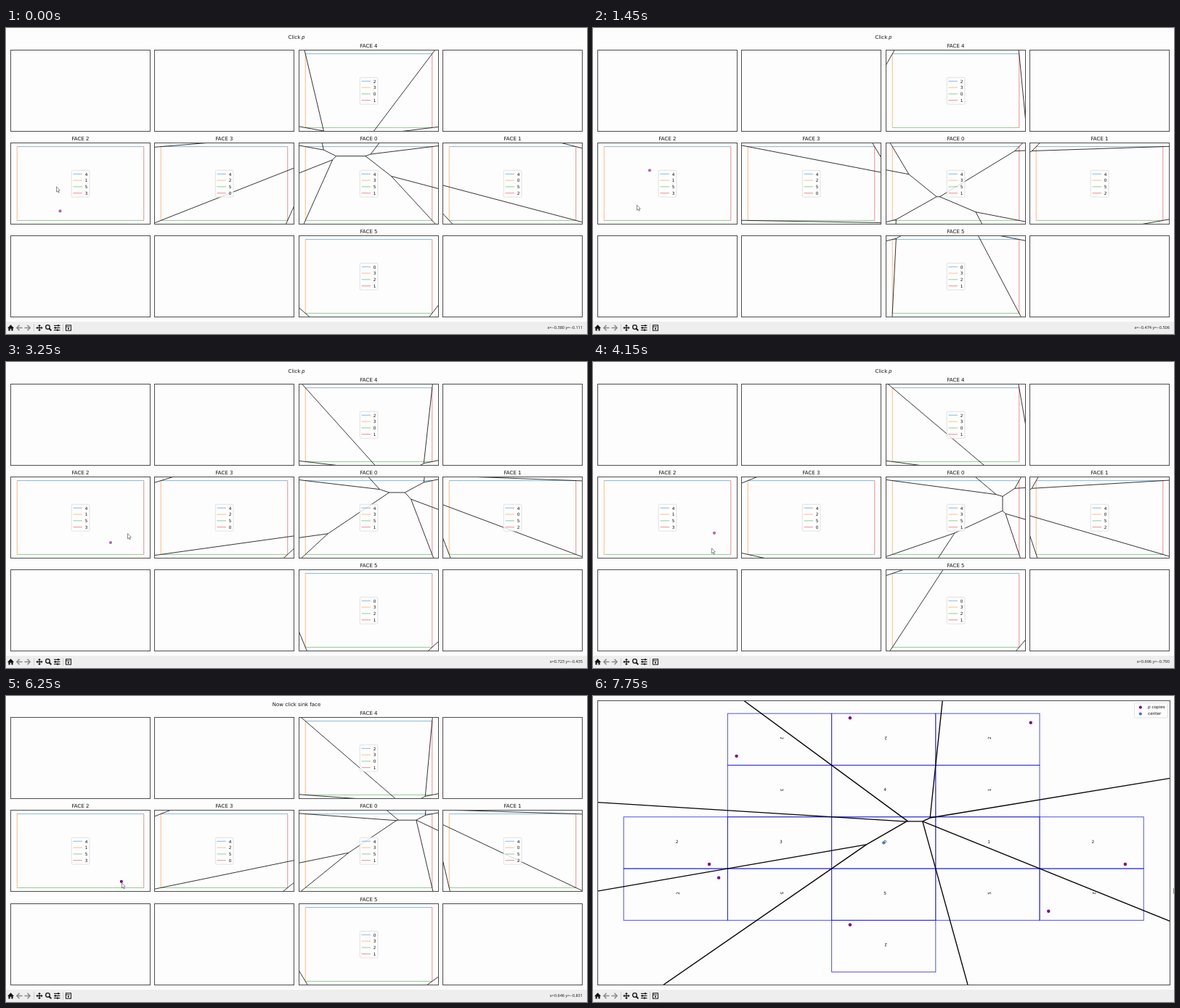
Animation, 800 px wide and 422 px high, one loop 8 s. Source, as an HTML page with a canvas:

```html
<!DOCTYPE html>
<html lang="en">
<head>
<meta charset="utf-8">
<title>Cut locus on a cube</title>
<style>
  html, body { margin: 0; width: 800px; height: 422px; overflow: hidden; }
  canvas { display: block; }
</style>
</head>
<body>
<canvas id="stage" width="800" height="422"></canvas>
<script>
const ctx = document.getElementById('stage').getContext('2d');
const LOOP = 8000, CLICKED = 6100, RESULT = 7200, REDRAW = 450;
const SANS = '"DejaVu Sans", sans-serif';
const PAPER = '#fdfdfe', BORDER = '#4c4c4c', PURPLE = '#800080', BLUE = '#4a78b5';
const SIDE_COLORS = ['#1f77b4', '#ff7f0e', '#2ca02c', '#d62728'];
const PANEL_W = 192, PANEL_H = 112, UNIT_X = PANEL_W / 2.2, UNIT_Y = PANEL_H / 2.2;

// Neighbours of each cube face: top, left, bottom, right.
const ADJ = [[4, 3, 5, 1], [4, 0, 5, 2], [4, 1, 5, 3], [4, 2, 5, 0], [2, 3, 0, 1], [0, 3, 2, 1]];
const DX = [0, -1, 0, 1], DY = [1, 0, -1, 0];
// Column and row of each face in the grid of panels.
const CELL = [[2, 1], [3, 1], [0, 1], [1, 1], [2, 0], [2, 2]];

// Mouse stops, reached every second redraw, starting before the loop does.
const STOP = 2 * REDRAW, FIRST_STOP = -1300;
const STOPS = [[74.5, 252.4], [69, 218], [78, 196.3], [60, 243.2], [144, 249], [167, 235.8],
  [163, 256], [158.9, 256.8], [158.9, 256.8], [544.5, 181.5], [799, 264.5]];

function mouse(t) {
  const s = Math.max(0, (t - FIRST_STOP) / STOP), i = Math.min(Math.floor(s), STOPS.length - 2);
  const ease = 1 - (1 - Math.min(1, s - i)) ** 2;
  return STOPS[i].map((v, axis) => v + (STOPS[i + 1][axis] - v) * ease);
}

const turn = ([x, y], r) => [[x, y], [-y, x], [-x, -y], [y, -x]][r];

// Images of p seen from a face, one per unfolding path to face 2.
function unfold(face, p) {
  const images = [];
  (function visit(path) {
    const [f, x, y, r] = path.at(-1);
    if (f === 2) {
      const [dx, dy] = turn(p, r);
      images.push({ x: x + dx, y: y + dy, path });
      return;
    }
    if (path.length === 4) return;
    ADJ[f].forEach((g, k) => {
      if (path.some(node => node[0] === g)) return;
      const d = (k + r) % 4;
      visit([...path, [g, x + 2 * DX[d], y + 2 * DY[d], (d + 6 - ADJ[g].indexOf(f)) % 4]]);
    });
  })([[face, 0, 0, 0]]);
  return images;
}

// Images that are nearest, ties included, somewhere on the closed face.
function nearest(images) {
  const kept = new Set(), n = 25;
  for (let i = -n; i <= n; i++) for (let j = -n; j <= n; j++) {
    const dist = images.map(s => (s.x - i / n) ** 2 + (s.y - j / n) ** 2);
    const best = Math.min(...dist) + 1e-6;
    images.forEach((s, k) => { if (dist[k] <= best) kept.add(s); });
  }
  return [...kept];
}

// Edges of the Voronoi diagram as [x1, y1, x2, y2].
function voronoi(sites) {
  const edges = [];
  sites.forEach((a, i) => sites.slice(i + 1).forEach(b => {
    const mx = (a.x + b.x) / 2, my = (a.y + b.y) / 2;
    const dx = a.y - b.y, dy = b.x - a.x;
    let lo = -40, hi = 40;
    for (const c of sites) {
      if (c === a || c === b) continue;
      const nx = c.x - a.x, ny = c.y - a.y;
      const slope = dx * nx + dy * ny;
      const room = (c.x ** 2 + c.y ** 2 - a.x ** 2 - a.y ** 2) / 2 - mx * nx - my * ny;
      if (Math.abs(slope) < 1e-9) { if (room < -1e-9) hi = lo; }
      else if (slope > 0) hi = Math.min(hi, room / slope);
      else lo = Math.max(lo, room / slope);
    }
    if (lo < hi) edges.push([mx + lo * dx, my + lo * dy, mx + hi * dx, my + hi * dy]);
  }));
  return edges;
}

const cache = new Map();
function faceEdges(face, p) {
  const key = [face, ...p].join();
  if (!cache.has(key)) cache.set(key, voronoi(nearest(unfold(face, p))));
  return cache.get(key);
}

function line(x1, y1, x2, y2, color, width) {
  ctx.strokeStyle = color;
  ctx.lineWidth = width;
  ctx.beginPath();
  ctx.moveTo(x1, y1);
  ctx.lineTo(x2, y2);
  ctx.stroke();
}

function poly(points, fill) {
  ctx.fillStyle = fill;
  ctx.beginPath();
  points.forEach(([x, y]) => ctx.lineTo(x, y));
  ctx.closePath();
  ctx.fill();
}

function dot(x, y, r, color) {
  ctx.fillStyle = color;
  ctx.beginPath();
  ctx.arc(x, y, r, 0, 7);
  ctx.fill();
}

function frame(x, y, w, h, color = BORDER, width = 1) {
  ctx.strokeStyle = color;
  ctx.lineWidth = width;
  ctx.strokeRect(x, y, w, h);
}

function text(str, x, y, size, align = 'center', style = '', family = SANS) {
  ctx.font = `${style} ${size}px ${family}`;
  ctx.textAlign = align;
  ctx.fillStyle = '#111';
  ctx.fillText(str, x, y);
}

function legendBox(x, y, w, h) {
  ctx.fillStyle = 'rgba(255,255,255,.8)';
  ctx.beginPath();
  ctx.roundRect(x, y, w, h, 1.5);
  ctx.fill();
  ctx.strokeStyle = '#dadada';
  ctx.lineWidth = .8;
  ctx.stroke();
}

function drawEdges(edges, X, Y, box, width) {
  ctx.save();
  ctx.beginPath();
  ctx.rect(...box);
  ctx.clip();
  for (const [x1, y1, x2, y2] of edges) line(X(x1), Y(y1), X(x2), Y(y2), '#000', width);
  ctx.restore();
}

function panelBox(col, row, clicked) {
  const top = clicked ? 29.5 + Math.floor(128.5 * row) : 30.5 + 128 * row;
  return [6.5 + Math.round(198.4 * col), top, PANEL_W, PANEL_H];
}

// Stage position in the units of the panel below it.
function toUnits([x, y]) {
  const col = Math.floor((x - 3) / 198.4), row = Math.floor((y - 22) / 128);
  const [left, top] = panelBox(col, row);
  return [(x - left - PANEL_W / 2) / UNIT_X, (top + PANEL_H / 2 - y) / UNIT_Y];
}

function drawFace(face, box, p, clicked) {
  const cx = box[0] + PANEL_W / 2, cy = box[1] + PANEL_H / 2;
  const X = u => cx + u * UNIT_X, Y = v => cy - v * UNIT_Y;
  text('FACE ' + face, cx, box[1] - 3.4, 7);
  const corners = [[1, 1], [-1, 1], [-1, -1], [1, -1]];
  ctx.globalAlpha = .65;
  corners.forEach(([x, y], k) => {
    const [x2, y2] = corners[(k + 1) % 4];
    line(X(x), Y(y), X(x2), Y(y2), SIDE_COLORS[k], .8);
  });
  ctx.globalAlpha = 1;
  if (face !== 2) drawEdges(faceEdges(face, p), X, Y, box, .8);
  legendBox(cx - 12.2, cy - 18.2, 24.6, 36.8);
  ADJ[face].forEach((g, k) => {
    const y = cy - 13.2 + k * 8.8;
    ctx.globalAlpha = .65;
    line(cx - 10, y, cx + 2.5, y, SIDE_COLORS[k], .8);
    ctx.globalAlpha = 1;
    text(g, cx + 8, y + 2.2, 5.8);
  });
  if (face === 2) dot(X(p[0]), Y(p[1]), 2.1, clicked ? PURPLE : 'rgba(128,0,128,.6)');
}

function drawPanels(t, tick) {
  const clicked = t >= CLICKED;
  if (clicked) text('Now click sink face', 400, 13.6, 7);
  else {
    text('Click ', 388.5, 14.6, 7, 'left');
    text('p', 407.1, 14.6, 7, 'left', 'italic');
  }
  const p = toUnits(mouse(tick - STOP));
  CELL.forEach((cell, face) => drawFace(face, panelBox(...cell, clicked), p, clicked));
  for (let i = 0; i < 12; i++) frame(...panelBox(i % 4, i >> 2, clicked));
}

const finalImages = nearest(unfold(0, [.646, -.829]));
const finalEdges = voronoi(finalImages);
const finalFaces = new Map(finalImages.flatMap(s => s.path).map(n => [n[1] + ',' + n[2], n]));

function drawResult() {
  const box = [6.5, 6.5, 788, 392];
  const X = u => 400.2 + u * 71.6, Y = v => 202.4 - v * 35.65;
  for (const [face, x, y, r] of finalFaces.values()) {
    frame(X(x - 1), Y(y + 1), 143.2, 71.3, 'rgba(25,25,215,.75)');
    ctx.save();
    ctx.translate(X(x) + (r ? 3 : 1.8), Y(y) - 1.8);
    ctx.rotate(-r * Math.PI / 2);
    text(face, 0, 2, 5.8);
    ctx.restore();
  }
  drawEdges(finalEdges, X, Y, box, 1.35);
  finalImages.forEach(s => dot(X(s.x), Y(s.y), 2.2, PURPLE));
  dot(X(0), Y(0), 2.1, BLUE);
  frame(...box);
  legendBox(745.5, 9.5, 45.5, 20.5);
  dot(753.8, 15.6, 2.1, PURPLE);
  dot(753.8, 24.6, 2.1, BLUE);
  text('p', 764, 17.4, 5.7, 'left', 'italic');
  text('copies', 769.4, 17.4, 5.7, 'left');
  text('center', 764, 26.4, 5.7, 'left');
}

function drawToolbar(t, tick) {
  ctx.fillStyle = '#eeeeee';
  ctx.fillRect(0, 405, 800, 17);
  // home
  poly([[2, 414], [6.5, 409.3], [11, 414], [9.6, 414], [9.6, 417.5], [7.4, 417.5], [7.4, 414.8],
    [5.6, 414.8], [5.6, 417.5], [3.4, 417.5], [3.4, 414]], '#111');
  // back and forward
  for (const [x, s] of [[18.5, 1], [29.5, -1]]) {
    line(x - 3 * s, 413.5, x + 4 * s, 413.5, '#888', 1.5);
    ctx.beginPath();
    ctx.moveTo(x, 409.8);
    ctx.lineTo(x - 3.6 * s, 413.5);
    ctx.lineTo(x, 417.2);
    ctx.stroke();
  }
  for (const x of [38.5, 78.5]) line(x, 408, x, 419, '#d0d0d0', 1);
  // pan
  line(42, 413.5, 50, 413.5, '#111', 1.2);
  line(46, 409.5, 46, 417.5, '#111', 1.2);
  for (let r = 0; r < 4; r++) {
    poly([[4.6, 0], [2.5, 2], [2.5, -2]].map(v => turn(v, r)).map(([x, y]) => [46 + x, 413.5 + y]), '#111');
  }
  // zoom
  line(59.5, 414.5, 62.4, 417.4, '#111', 1.8);
  ctx.lineWidth = 1.3;
  ctx.beginPath();
  ctx.arc(57.5, 412.5, 2.8, 0, 7);
  ctx.stroke();
  // sliders
  [72, 68, 71].forEach((x, i) => {
    const y = 410.4 + 3.1 * i;
    line(66, y, 74.5, y, '#111', 1.1);
    line(x, y - 1.4, x, y + 1.4, '#111', 1.3);
  });
  // save
  frame(82.5, 409.8, 7, 7.4, '#111', 1);
  line(83, 412, 88, 412, '#111', .9);
  dot(86, 414.7, 1.1, '#111');
  if (t < RESULT) {
    const [x, y] = toUnits(mouse(tick - REDRAW / 2)).map(v => v.toFixed(3).replace('-', '−'));
    text(`x=${x} y=${y}`, 794, 415.4, 5.6, 'right', '', '"Open Sans", sans-serif');
  }
}

function drawCursor(x, y) {
  poly([[0, 0], [0, 7.2], [1.6, 5.8], [2.7, 8.3], [3.8, 7.8], [2.7, 5.4], [4.8, 5.2]]
    .map(([dx, dy]) => [x + dx + .5, y + dy + .8]), '#fff');
  ctx.strokeStyle = '#444';
  ctx.lineWidth = .6;
  ctx.stroke();
}

function draw(now) {
  const t = now % LOOP;
  const tick = 50 + REDRAW * Math.floor((t - 50) / REDRAW);
  ctx.fillStyle = PAPER;
  ctx.fillRect(0, 0, 800, 422);
  if (t < RESULT) drawPanels(t, tick);
  else drawResult();
  drawToolbar(t, tick);
  drawCursor(...mouse(tick));
  requestAnimationFrame(draw);
}
requestAnimationFrame(draw);
</script>
</body>
</html>
```
